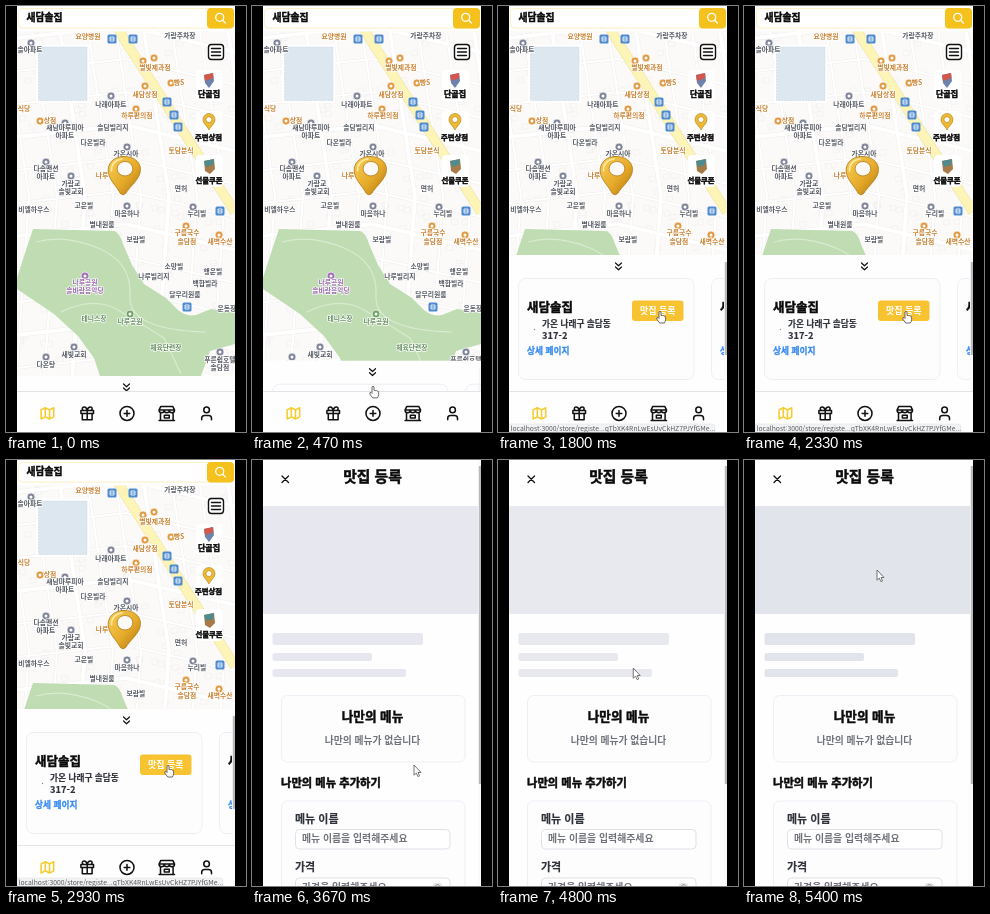
An HTML page for the animation above (5470 ms loop, 240 px wide and 426 px high).

```html
<!DOCTYPE html>
<html lang="ko">
<head>
<meta charset="utf-8">
<style>
html, body { margin: 0; width: 100%; height: 100%; overflow: hidden; background: #000; }
svg { display: block; width: 100vw; height: 100vh; }
text { font-family: "Noto Sans CJK KR", "Noto Sans CJK", "Noto Sans", sans-serif; white-space: pre; }
.b { font-weight: 900; fill: #0b0b0b; stroke: #0b0b0b; stroke-width: .45; }
.d { font-weight: 900; fill: #30323a; stroke: #30323a; stroke-width: .15; }
.l { font-weight: 900; fill: #3b8df0; stroke: #3b8df0; stroke-width: .3; }
.g { font-weight: 800; fill: #70737a; }
.m { text-anchor: middle; }
.card { fill: #fdfdfe; stroke: #e9ebf1; stroke-width: .8; }
.line { fill: none; stroke: #111; stroke-width: 2.2; stroke-linejoin: round; stroke-linecap: round; }
#labels text { font-size: 6.8px; font-weight: 700; text-anchor: middle; paint-order: stroke; stroke: #fff; stroke-width: 1.4px; stroke-linejoin: round; }
</style>
</head>
<body>
<svg viewBox="0 0 240 426" preserveAspectRatio="none">
<defs>
  <clipPath id="phone"><rect x="11" width="218" height="426"/></clipPath>
  <clipPath id="view"><rect x="11" y="25" width="218" height="361"/></clipPath>
  <linearGradient id="gold" x1="0" y1="0" x2="1" y2="1">
    <stop offset="0" stop-color="#f7cf58"/><stop offset=".55" stop-color="#e6ab2a"/><stop offset="1" stop-color="#b0740f"/>
  </linearGradient>
</defs>
<rect width="240" height="426"/>
<g clip-path="url(#phone)">
  <rect x="11" width="218" height="426" fill="#fefefe"/>

  <g id="home">
    <g clip-path="url(#view)">
      <g id="map">
        <rect x="11" y="25" width="218" height="350" fill="#fbfaf9"/>
        <g id="blocks" fill="none"></g>
        <path d="M30 38.500H83V97H30z" fill="#fff"/>
        <path d="M32.500 41H81V94.500H32.500z" fill="#dce7f0" stroke="#cfdbe7" stroke-width=".7" stroke-dasharray="2 1"/>
        <path d="M27 223L108 225Q114 227 117 238L126 259L138 278L160 292L172 304Q180 311 190 309L205 303L229 307V338L204 345L195 370H94L88 352L72 330L48 308L11 283V272L18 250z" fill="#bfdcb2"/>
        <g fill="none" stroke="#d9ebd1" stroke-width="1.200">
          <path d="M30 236Q58 228 92 242T124 290T200 326"/>
          <path d="M55 306Q88 290 112 304T158 332L175 368"/>
        </g>
        <g fill="none" stroke-linejoin="round">
          <path d="M112 22L118 33L163 103L193 150L229 206" stroke="#efe3a4" stroke-width="10"/>
          <path d="M112 22L118 33L163 103L193 150L229 206" stroke="#fdf4b8" stroke-width="8.800"/>
        </g>
        <g id="spots"></g>
        <g id="labels"></g>
        <path d="M118 150.500C108 150.500 101.800 157 102.200 165C102.600 174 110 179 114 187Q117 190.500 120 187C124 180 134.500 173 134.500 163.500C134.500 156 128 150.500 118 150.500zM119 155.500A7.800 7.200 0 1 1 118.900 155.500z" fill="url(#gold)" fill-rule="evenodd" stroke="#b27a17" stroke-width=".8"/>
        <path d="M105.500 165Q105 155 116 152.800" fill="none" stroke="#ffe9a2" stroke-width="1.600" stroke-linecap="round"/>
      </g>

      <rect x="202.500" y="38.500" width="15" height="15" rx="3" fill="#fff" stroke="#111" stroke-width="1.400"/>
      <path d="M205.500 42.500h9M205.500 46h9M205.500 49.500h9" class="line" style="stroke-width:1.400"/>
      <g fill="#fff">
        <rect x="190" y="64" width="27" height="31" rx="4"/>
        <rect x="190" y="105" width="27" height="32" rx="4"/>
        <rect x="190" y="149" width="27" height="32" rx="4"/>
      </g>
      <path d="M198 69L207 67L208 75L203 82L199 77z" fill="#6b83ad"/>
      <path d="M198 69L207 67L207.500 72L199 75z" fill="#d4574c"/>
      <path d="M203 107.500a6 6 0 0 0-6 6.200c0 4 4 6 6 10.300c2-4.300 6-6.300 6-10.300a6 6 0 0 0-6-6.200zm0 3.200a2.900 2.900 0 1 1-.1 0z" fill="#ecba34" fill-rule="evenodd" stroke="#b67d13" stroke-width=".6"/>
      <path d="M198 155L208 153L209 163L204 168L199 165z" fill="#a77a48"/>
      <path d="M198 155L208 153L207 159L200 161z" fill="#4d8b8e"/>
      <g>
        <text class="b m" x="203" y="91" font-size="8">단골집</text>
        <text class="b m" x="202.500" y="134" font-size="7.400">주변상점</text>
        <text class="b m" x="203" y="177" font-size="7.400">선물쿠폰</text>
      </g>

      <g id="sheet">
        <rect x="11" y="0" width="218" height="200" fill="#fefefe"/>
        <path class="line" style="stroke-width:1.200" d="M117.500 8l3 2.800l3-2.800M117.500 12l3 2.800l3-2.800"/>
        <rect class="card" x="20.500" y="23.500" width="175.500" height="101" rx="7"/>
        <rect class="card" x="213.500" y="23.500" width="175.500" height="101" rx="7"/>
        <text class="b" x="29" y="57" font-size="12.500">새담솔집</text>
        <circle cx="36.500" cy="74.500" r=".7" fill="#888"/>
        <text class="d" x="44" y="72" font-size="8.700">가온 나래구 솔담동</text>
        <text class="d" x="44" y="83.500" font-size="9.300">317-2</text>
        <text class="l" x="29" y="99" font-size="8.700">상세 페이지</text>
        <rect x="134" y="45.500" width="51.500" height="20.500" rx="3" fill="#f8c331"/>
        <text class="m" x="159.700" y="59" font-size="9" font-weight="900" fill="#fff">맛집 등록</text>
        <text class="b" x="222" y="57" font-size="12.500">새</text>
        <text class="l" x="222" y="99" font-size="8.700">상</text>
        <g id="thumb">
          <rect x="226" y="0" width="3" height="140" fill="#fafafa"/>
          <rect x="226.800" y="7" width="2.200" height="93" fill="#b9babd"/>
        </g>
      </g>
    </g>

    <rect x="11" width="218" height="25.500" fill="#fefefe"/>
    <rect x="12.500" y="2.500" width="215" height="19.500" rx="4" fill="#fff" stroke="#fbf0c6" stroke-width="1"/>
    <text class="b" x="20.500" y="15" font-size="9.800">새담솔집</text>
    <rect x="201" y="2" width="27" height="20.500" rx="4" fill="#f4c11d"/>
    <g fill="none" stroke="#fff" stroke-width="1.300" stroke-linecap="round"><circle cx="213.700" cy="11.300" r="4"/><path d="M216.700 14.300l2.800 2.800"/></g>

    <rect x="11" y="385" width="218" height="41" fill="#fefefe"/>
    <path d="M11 385.500H229" stroke="#e2e3e6"/>
    <g id="nav"></g>
    <g id="status">
      <path d="M11 418H214q3 0 3 3V426H11z" fill="#f2f3f3" stroke="#dcdee0" stroke-width=".5"/>
      <text x="12.500" y="425" font-size="6.800" fill="#55585d">localhost:3000/store/registe...qTbXK4RnLwEsUvCkHZ7PJYfGMe...</text>
    </g>
  </g>

  <g id="form">
    <path class="line" style="stroke-width:1.300" d="M30 16l6.500 6.500M36.500 16l-6.500 6.500"/>
    <text class="b m" x="120.500" y="22" font-size="14.800">맛집 등록</text>
    <g id="bones" fill="#e2e4ec">
      <rect x="11" y="46" width="217" height="108"/>
      <rect x="20.500" y="173" width="150.500" height="12" rx="2"/>
      <rect x="20.500" y="193" width="99.500" height="8" rx="2"/>
      <rect x="20.500" y="209" width="133.500" height="8" rx="2"/>
    </g>
    <rect class="card" x="29.500" y="235.500" width="183.500" height="66.500" rx="6"/>
    <text class="b m" x="120.500" y="261" font-size="12.600">나만의 메뉴</text>
    <text class="g m" x="120.500" y="284" font-size="9.800">나만의 메뉴가 없습니다</text>
    <text class="b" x="29" y="326.500" font-size="11.300">나만의 메뉴 추가하기</text>
    <rect class="card" x="29.500" y="341" width="183.500" height="110" rx="6"/>
    <text class="d" x="43" y="362.500" font-size="11">메뉴 이름</text>
    <text class="d" x="43" y="411" font-size="11">가격</text>
    <g fill="#fff" stroke="#dcdee4" stroke-width=".9">
      <rect x="43.500" y="369.500" width="154.500" height="19.500" rx="4"/>
      <rect x="43.500" y="418" width="154.500" height="19.500" rx="4"/>
    </g>
    <g font-size="9.900">
      <text class="g" x="50" y="382">메뉴 이름을 입력해주세요</text>
      <text class="g" x="50" y="430.500">가격을 입력해주세요</text>
    </g>
    <path d="M181 426v-1q0-2 2-2h5q2 0 2 2v1z" fill="#e5e6e9"/>
    <path d="M183.500 426l2-2l2 2" fill="none" stroke="#777" stroke-width=".8"/>
    <rect x="226" y="0" width="3" height="426" fill="#fafafa"/>
    <rect x="226.800" y="6" width="2.200" height="318" fill="#b9babd"/>
  </g>

  <g id="cursor">
    <path id="arrow" d="M0 0V10.200L2.300 8.100L3.900 11.600L5.500 10.900L4 7.500H7z" fill="#fff" stroke="#555" stroke-width=".8" stroke-linejoin="round"/>
    <path id="hand" d="M-1 6.500V1Q0-.500 1 1V4.500Q2 3.800 2.600 4.700Q3.700 4.200 4.200 5.200Q5.600 4.900 5.600 6.300V8.500Q5.500 10.500 4.300 12H-.300L-3.300 8Q-3.500 6.300-2 6.500L-1 7.500z" fill="#fff" stroke="#444" stroke-width=".8" stroke-linejoin="round"/>
    <path id="beam" d="M-2-4Q0-4 0-3Q0-4 2-4M0-3V4M-2 5Q0 5 0 4Q0 5 2 5" fill="none" stroke="#444" stroke-width=".9"/>
  </g>
</g>
</svg>
<script>
const LOOP = 5470, FPS = 15, OPENED = 3250;
const $ = id => document.getElementById(id);
const clamp = v => Math.max(0, Math.min(1, v));
const ease = v => { v = clamp(v); return v * v * (3 - 2 * v); };
const show = (id, on) => $(id).setAttribute('display', on ? 'inline' : 'none');
const move = (id, x, y) => $(id).setAttribute('transform', `translate(${x} ${y})`);

// small streets and building outlines
let streets = '';
let seed = 7;
const rand = () => (seed = seed * 16807 % 2147483647) / 2147483647;
for (let i = 0; i < 110; i++) {
  streets += `<path d="M${11 + rand() * 212} ${27 + rand() * 335}l6-1l1 5l-6 1z" stroke="#edebea" stroke-width=".5"/>`;
}
for (const [color, extra] of [['#eeecea', .8], ['#fff', 0]]) {
  for (let i = 0; i < 11; i++) {
    const y = 32 + i * 33, x = -30 + i * 28;
    streets += `<path d="M11 ${y}L120 ${y - 12}L229 ${y + 14}M${x} 25L${x + 25} 190L${x + 12} 375" stroke="${color}" stroke-width="${(i % 3 ? 2.2 : 4) + extra}"/>`;
  }
}
$('blocks').innerHTML = streets;

const labels = {
  '#555962': '174,32,가람주차장|24,46,솔아파트|105,101,나래아파트|59,124,새담마루피아|59,132,아파트|107,124,솔담빌리지|87,139,다온빌라|120,150,가온시아|40,165,다솜맨션|40,173,아파트|65,180,가람교|65,188,솔빛교회|175,185,면허|78,202,고운빌|121,210,마음하나|191,210,누리빌|28,206,비엘하우스|96,221,별내원룸|130,236,보람빌|168,263,소망빌|207,268,행운빌|148,273,나루빌리지|199,280,백합빌라|179,291,달무리원룸|68,351,새빛교회|40,361,다온탕|214,356,푸른쉼호텔|214,364,솔담점|221,305,운동장',
  '#c98335': '82,33,요양병원|149,64,별빛제과점|173,79,빵S|139,91,새담상점|131,112,하루편의점|44,117,상점|18,105,식당|175,147,토담분식|96,172,나루|181,229,구름국수|181,238,솔담점|214,238,새벽수산',
  '#9b6bad': '79,279,나루공원|79,287,솔바람음악당',
  '#638c5e': '88,315,테니스장|124,318,나루공원|160,344,체육단련장'
};
for (const [color, list] of Object.entries(labels)) {
  $('labels').innerHTML += list.split('|').map(s => {
    const [x, y, word] = s.split(',');
    return `<text x="${x}" y="${y}" fill="${color}">${word}</text>`;
  }).join('');
}

const dots = {
  '#7f8499': [[105, 90], [59, 117], [40, 156], [65, 170], [121, 200], [187, 201], [121, 141], [68, 341], [40, 351], [25, 37], [214, 346]],
  '#e19a43': [[137, 55], [139, 80], [130, 103], [34, 115], [165, 77], [213, 229], [180, 220], [148, 52]],
  '#a26eb5': [[79, 270]],
  '#70a568': [[124, 308]]
};
for (const [color, list] of Object.entries(dots)) {
  $('spots').innerHTML += list.map(([x, y]) =>
    `<circle cx="${x}" cy="${y}" r="4" fill="${color}" stroke="#fff" stroke-width=".7"/><circle cx="${x}" cy="${y}" r="1.500" fill="#fff"/>`).join('');
}
$('spots').innerHTML += [[106, 33], [127, 33], [161, 96], [168, 109], [172, 121], [214, 205], [181, 301]].map(([x, y]) =>
  `<rect x="${x - 4.5}" y="${y - 4.5}" width="9" height="9" rx="1.500" fill="#508bd0"/><path d="M${x - 2} ${y - 2}h4v4h-4zm0 2h4" fill="none" stroke="#fff" stroke-width=".8"/>`).join('');

$('nav').innerHTML = [
  'M3 7l6-3l6 3l6-3v13l-6 3l-6-3l-6 3zM9 4v13M15 7v13',
  'M3 8h18v4H3zM12 8v13M19 12v9H5v-9M7.500 8a2.500 2.500 0 0 1 0-5C11 3 12 8 12 8s1-5 4.500-5a2.500 2.500 0 0 1 0 5',
  'M2 12a10 10 0 1 0 20 0a10 10 0 1 0-20 0M12 8v8M8 12h8',
  'M1 22h22M3 22V11M21 22V11M1 7l2.500-5h17l2.500 5v1a3.660 3 0 0 1-7.330 0a3.660 3 0 0 1-7.330 0a3.660 3 0 0 1-7.330 0zM1 7h22M8.500 14.500h7v4h-7z',
  'M8 7a4 4 0 1 0 8 0a4 4 0 1 0-8 0M5 21v-2a4 4 0 0 1 4-4h6a4 4 0 0 1 4 4v2'
].map((d, i) => `<path class="line" d="${d}" transform="translate(${33 + i * 39.8} 399) scale(.7)"${i ? '' : ' style="stroke:#f5cc2c"'}/>`).join('');

// pointer stops: time, x, y of the tip
const stops = [
  [70, 130, 432], [330, 121, 380], [460, 121, 380], [870, 156, 305], [930, 156, 305],
  [1130, 162, 305], [3700, 162, 305], [4130, 137, 285], [4400, 137, 285], [5270, 133, 110], [LOOP, 133, 110]
];
function pointer(t) {
  const i = Math.max(1, stops.findIndex(s => s[0] >= t));
  const [t0, x0, y0] = stops[i - 1], [t1, x1, y1] = stops[i];
  const k = ease((t - t0) / (t1 - t0));
  return [x0 + (x1 - x0) * k, y0 + (y1 - y0) * k];
}

function draw(t) {
  const onForm = t >= OPENED;
  show('home', !onForm);
  show('form', onForm);
  show('status', t >= 1060);
  const open = ease((t - 400) / 300);
  move('sheet', 0, 370 - 121 * open);
  $('thumb').setAttribute('opacity', open);

  const wave = (1 - Math.cos((t - OPENED) / 1000 * Math.PI)) / 2;
  $('bones').setAttribute('opacity', 1 - .5 * wave);

  const [x, y] = pointer(t);
  const overText = onForm && x > 73 && x < 168 && (y > 274 && y < 288 || y > 250 && y < 264 && x > 90 && x < 151);
  const overLink = !onForm && (y > 370 && y < 390 || x > 134 && y > 294 && y < 315);
  move('cursor', x, y);
  show('cursor', t > 70);
  show('beam', overText);
  show('hand', overLink);
  show('arrow', !overText && !overLink);
}

const start = performance.now();
function tick() {
  const t = (performance.now() - start) % LOOP;
  draw(Math.floor((t + 3.4) * FPS / 1000) * 1000 / FPS);
  requestAnimationFrame(tick);
}
draw(0);
tick();
</script>
</body>
</html>
```
